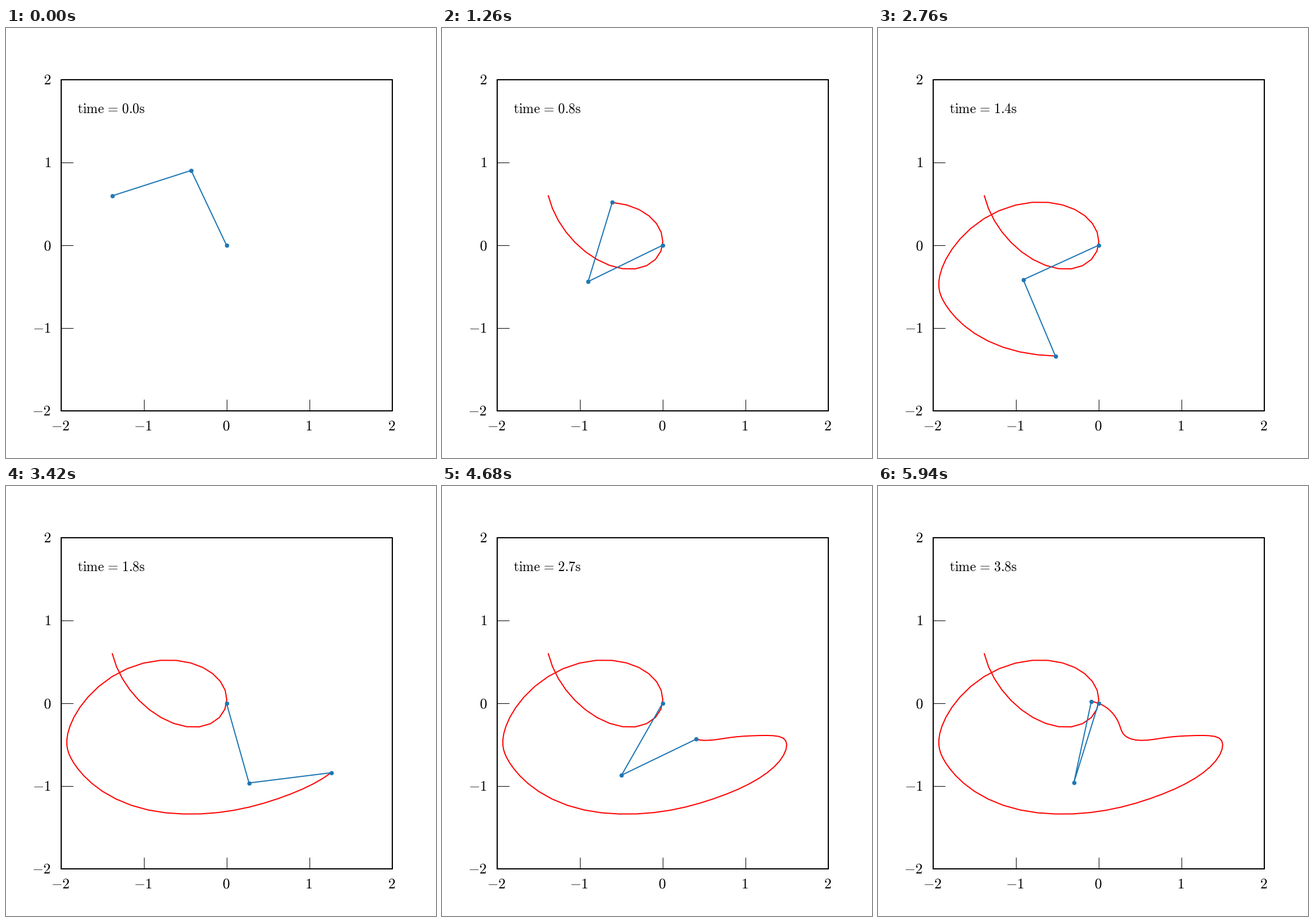
These frames come from a looping animation (748 px wide and 748 px high, 6 s). A matplotlib script:

```python
import matplotlib.pyplot as plt
import numpy as np
from matplotlib.animation import FuncAnimation
from matplotlib.transforms import ScaledTranslation

SIZE, DPI = 748, 64
PX = 72 / DPI                        # points per pixel
FRAMES, INTERVAL = 100, 60
LEFT, BOTTOM, SIDE = 95.6, 666, 576  # plot box in pixels

# Key poses: (step, angle of first rod, angle of second rod), from straight down
POSES = [
    (2, -2.70, -1.26), (9, -2.43, 0.014), (15, -1.67, 1.515), (21, -1.117, 2.846),
    (27, -1.038, 4.089), (33, -1.235, 4.89), (39, -1.36, 5.44), (46, -1.142, 6.682),
    (52, -0.366, 7.633), (59, 0.453, 8.06), (64, 0.58, 8.283), (69, 0.257, 8.466),
    (73, -0.076, 8.464), (77, -0.45, 8.328), (87, -0.613, 8.452), (99, -0.3015, 9.213),
]

# The clock runs unevenly: (step, seconds)
CLOCK = [(2, 0), (25, 0.94), (46, 1.42), (69, 2.3), (99, 3.8)]


def spline(x, keys, values):
    """Natural cubic spline, written as a sum of cubed distances to the keys."""
    def basis(p):
        return np.abs(np.subtract.outer(p, keys)) ** 3

    keys = np.array(keys, float)
    line = np.vander(keys, 2)
    system = np.block([[basis(keys), line], [line.T, np.zeros((2, 2))]])
    weights = np.linalg.solve(system, [*values, 0, 0])
    return np.hstack([basis(x), np.vander(x, 2)]) @ weights


# The first two steps are too short to show any movement.
steps = np.maximum(np.arange(FRAMES), 2.0)
keys, first, second = zip(*POSES)
a, b = spline(steps, keys, first), spline(steps, keys, second)
elbow_x, elbow_y = np.sin(a), -np.cos(a)
tip_x, tip_y = elbow_x + np.sin(b), elbow_y - np.cos(b)
clock = np.abs(spline(steps, *zip(*CLOCK)))

plt.rcParams["mathtext.fontset"] = "cm"
fig = plt.figure(figsize=(SIZE / DPI, SIZE / DPI), dpi=DPI, facecolor="white")
ax = fig.add_axes([LEFT / SIZE, 1 - BOTTOM / SIZE, SIDE / SIZE, SIDE / SIZE])
ax.set(xlim=(-2, 2), ylim=(-2, 2), xticks=range(-2, 3), yticks=range(-2, 3))
ax.tick_params(direction="in", length=20.5 * PX, width=PX, pad=16 * PX,
               labelsize=25.3 * PX)
for axis in (ax.xaxis, ax.yaxis):
    axis.set_major_formatter(lambda v, _: f"${v:.0f}$")
nudge = ScaledTranslation(-1.2 / DPI, 1 / DPI, fig.dpi_scale_trans)
for tick in ax.get_xticklabels() + ax.get_yticklabels():
    tick.set_transform(tick.get_transform() + nudge)
for spine in ax.spines.values():
    spine.set_linewidth(2 * PX)

trail, = ax.plot([], [], color="red", lw=2 * PX)
rods, = ax.plot([], [], "o-", color="#1f77b4", lw=2 * PX, ms=6.6 * PX, zorder=3)
label = ax.text(0.0485, 0.9, "", transform=ax.transAxes, fontsize=23.5 * PX)


def update(n):
    trail.set_data(tip_x[:n + 1], tip_y[:n + 1])
    rods.set_data([0, elbow_x[n], tip_x[n]], [0, elbow_y[n], tip_y[n]])
    label.set_text(rf"$\mathrm{{time}}\hspace{{0.133}}=\hspace{{0.133}}"
                   rf"{clock[n]:.1f}\mathrm{{s}}$")
    return trail, rods, label


anim = FuncAnimation(fig, update, frames=FRAMES, interval=INTERVAL,
                     repeat=True, repeat_delay=0)
plt.show()
```
